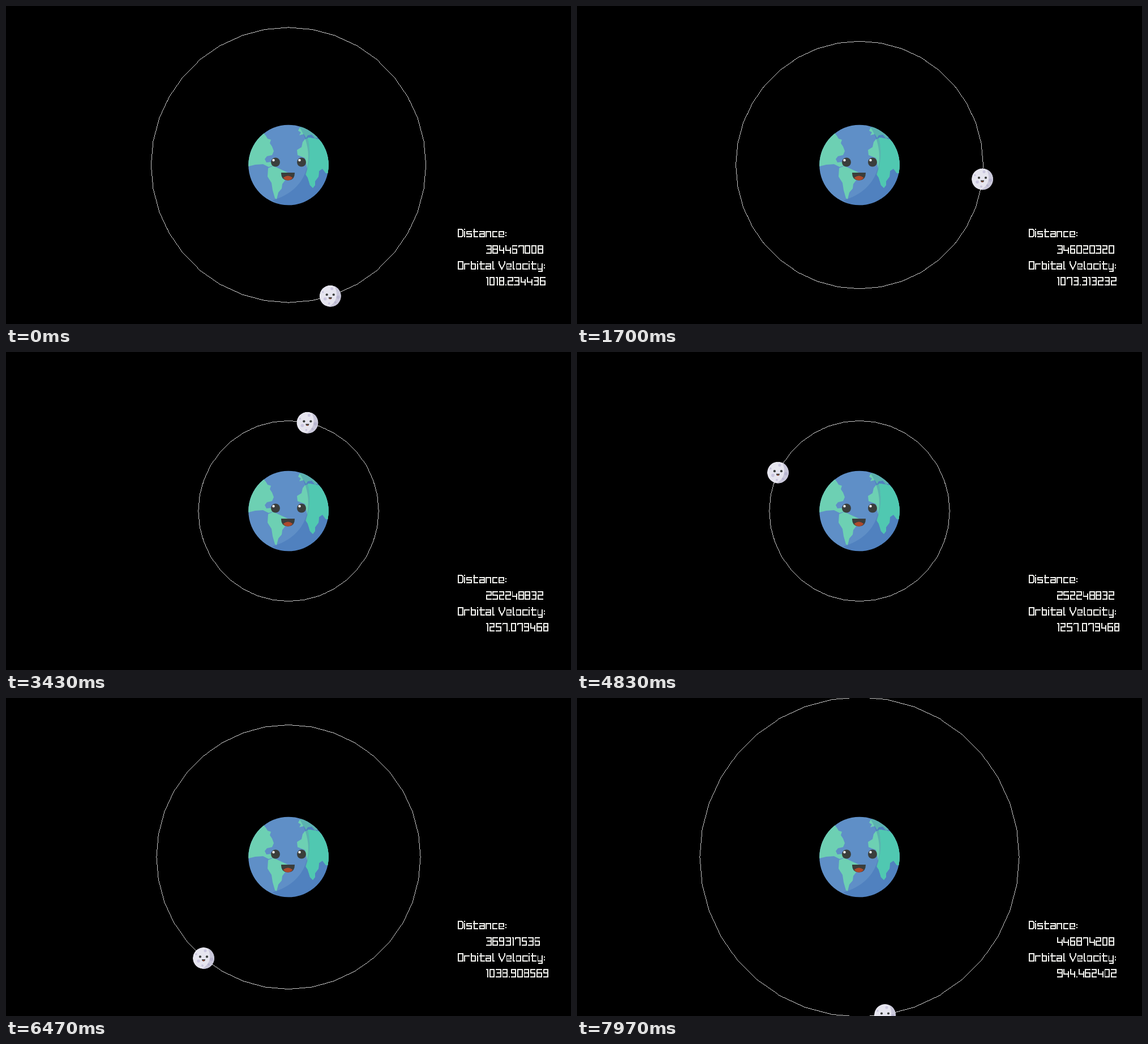
Recreate the animation shown at these times as an HTML page. Size 998 by 561 pixels, loop 8 s.

```html
<!DOCTYPE html>
<html lang="en">
<head>
<meta charset="utf-8">
<title>Moon orbit</title>
<style>
  html, body { margin: 0; width: 100%; height: 100%; overflow: hidden; background: #000; }
  svg { display: block; width: 100%; height: 100%; }
  #orbit { fill: none; stroke: #c8c8c8; shape-rendering: crispEdges; }
  .line path { fill: none; stroke: #f2f2ee; stroke-linecap: square; shape-rendering: crispEdges; }
  .line text { font: 7px "DejaVu Sans Mono", monospace; fill: transparent; }
</style>
</head>
<body>
<svg viewBox="0 0 998 561">
  <defs>
    <clipPath id="earthClip"><circle cx="499" cy="280.5" r="70.8"/></clipPath>
    <clipPath id="moonClip"><circle r="19"/></clipPath>
  </defs>

  <path id="orbit"/>

  <g clip-path="url(#earthClip)">
    <rect x="428" y="209" width="142" height="143" fill="#5f8fc7"/>
    <g fill="#6dd0b3">
      <path d="M425 220L455 224L459 229L462 234L468 236L466 242L470 248L473 256L470 263L461 265L457 270L460 276L469 275L473 281L464 284L454 279L440 280L428 283Z"/>
      <path d="M463 286L472 282L485 288L498 294L495 305L488 314L487 322L481 329L478 341L475 339L471 325L469 312L462 301Z"/>
      <path d="M528 235L537 232L552 235L575 255V295H565L559 287L553 291L552 301L546 309V316L542 321L537 316L533 303L529 297L532 287L528 268L515 263L514 254L522 249L524 240Z"/>
      <path d="M516 220L519 214L530 211L555 230L546 234L540 227L533 228L530 233L526 226L518 228L521 223Z"/>
    </g>
    <path d="M512 205C545 245 548 320 470 343L500 360H580V205Z" fill="#2458a8" opacity=".25"/>
    <path d="M533 232L552 235L575 255V295H565L559 287L553 291L552 301L546 309V316L542 321L537 316L533 303L530 298Q541 264 533 232Z" fill="#50c8b1"/>
  </g>
  <g fill="#3b3e3c">
    <circle cx="476" cy="275.5" r="8"/>
    <circle cx="522" cy="275.5" r="8"/>
    <path d="M486 294H510Q510 307.5 498 307.5T486 294Z"/>
  </g>
  <path d="M489.5 303Q498 296 506.5 303Q503 307.5 498 307.5T489.5 303Z" fill="#ad4a2c"/>
  <g fill="#fff">
    <circle cx="472.5" cy="272" r="2.2"/>
    <circle cx="518.5" cy="272" r="2.2"/>
  </g>

  <g id="moon">
    <g clip-path="url(#moonClip)">
      <circle r="19" fill="#e6e5ef"/>
      <path d="M7 -19Q19 6 -3 19H20V-19Z" fill="#c9c7da"/>
      <g fill="#cbc7e0">
        <circle cx="3" cy="-13" r="2.5"/>
        <circle cx="-9" cy="5" r="2.8"/>
        <circle cx="-13" cy="-7" r="1.8"/>
        <circle cx="-2" cy="13" r="2"/>
      </g>
      <g fill="#b9b6d0">
        <circle cx="14" cy="2" r="3"/>
        <circle cx="9" cy="11" r="2"/>
      </g>
    </g>
    <g fill="#3b3e3c">
      <circle cx="-6" cy="-2.5" r="2.1"/>
      <circle cx="6" cy="-2.5" r="2.1"/>
      <path d="M-3 2H3Q3 5.5 0 5.5T-3 2Z"/>
    </g>
    <path d="M-2 4.5Q0 2.8 2 4.5Q0 6 -2 4.5Z" fill="#ad4a2c"/>
  </g>

  <g id="readout"></g>
</svg>
<script>
const LOOP = 8000, CX = 499, CY = 280.5;
const PX_PER_METRE = 0.6313e-6;
const MOON_SPEED = 0.1526;          // px per ms along the orbit
const GM = 3.98615898e14;
const START_ANGLE = -72.35 * Math.PI / 180;
const SIDES = 36;

// Each press scales the orbit at once: [time, factor].
const presses = [
  [575, .9], [2000, .9], [2330, .9], [2806, .9],
  [4930, 1.1], [5450, 1.1], [5980, 1.1], [6330, 1.1], [6740, 1.1], [7060, 1.1]
];

// Pixel lettering: [advance, strokes] on a grid eight cells high.
const box = 'M0 0H4V7H0Z', dot = 'h.01';
const glyphs = {
  0: [6, box],
  1: [3, 'M0 0H1V7'],
  2: [6, 'M0 0H4V3H0V7H4'],
  3: [6, 'M0 0H4V7H0M1 3H4'],
  4: [6, 'M0 0V4H4M4 2V7'],
  5: [6, 'M4 0H0V3H4V7H0'],
  6: [6, 'M4 0H0V7H4V3H0'],
  7: [6, 'M0 1V0H4V7'],
  8: [6, box + 'M0 3H4'],
  9: [6, 'M4 3H0V0H4V7H0'],
  '.': [2, 'M0 7' + dot],
  ':': [2, 'M0 3' + dot + 'M0 6' + dot],
  ' ': [3, ''],
  D: [6, 'M0 0H3L4 1V6L3 7H0Z'],
  O: [6, box],
  V: [7, 'M0 0V2L2.5 7L5 2V0'],
  a: [6, 'M0 2H4V7H0V4H4'],
  b: [6, 'M0 0V7H4V2H0'],
  c: [6, 'M4 2H0V7H4'],
  e: [6, 'M4 7H0V2H4V5H0'],
  i: [2, 'M0 0' + dot + 'M0 2V7'],
  l: [3, 'M0 0V7H1'],
  n: [6, 'M0 7V2H4V7'],
  o: [6, 'M0 2H4V7H0Z'],
  r: [6, 'M0 7V2H4'],
  s: [6, 'M4 2H0V4H4V7H0'],
  t: [6, 'M1 0V7H4M0 2H4'],
  y: [6, 'M0 2V7H4M4 2V9H1']
};

const byId = id => document.getElementById(id);
function add(parent, tag, attrs) {
  const node = document.createElementNS('http://www.w3.org/2000/svg', tag);
  for (const key in attrs) node.setAttribute(key, attrs[key]);
  return parent.appendChild(node);
}

function makeLine(x, y) {
  const line = add(byId('readout'), 'g', {
    class: 'line', transform: `translate(${x} ${y}) scale(1.9)`
  });
  const strokes = add(line, 'g', { transform: 'translate(.5 .5)' });
  const label = add(line, 'text', { y: 8 });
  return text => {
    if (label.textContent === text) return;
    label.textContent = text;
    strokes.replaceChildren();
    let pen = 0;
    for (const char of text) {
      const [advance, d] = glyphs[char];
      if (d) add(strokes, 'path', { d, transform: `translate(${pen} 0)` });
      pen += advance;
    }
  };
}

makeLine(798, 393)('Distance:');
makeLine(798, 450)('Orbital Velocity:');
const showDistance = makeLine(848, 422);
const showVelocity = makeLine(848, 478);

function makeStage(start, distance, angle) {
  const radius = distance * PX_PER_METRE;
  return { start, distance, radius, angle, spin: MOON_SPEED / radius };
}
const stages = [makeStage(0, 384467008, START_ANGLE)];
for (const [time, factor] of presses) {
  const last = stages[stages.length - 1];
  stages.push(makeStage(time, Math.fround(last.distance * factor),
    last.angle + last.spin * (time - last.start)));
}

const pointAt = (radius, angle) =>
  [CX + radius * Math.cos(angle), CY - radius * Math.sin(angle)];

// One whole pixel per step along the longer axis, without smoothing.
function pixelLine([x0, y0], [x1, y1]) {
  const steps = Math.ceil(Math.max(Math.abs(x1 - x0), Math.abs(y1 - y0)));
  let d = '';
  for (let i = 0; i < steps; i++) {
    const x = Math.floor(x0 + (x1 - x0) * i / steps);
    const y = Math.floor(y0 + (y1 - y0) * i / steps);
    d += `M${x} ${y + .5}h1`;
  }
  return d;
}

function orbitPath(radius) {
  const corner = i => pointAt(radius, i * 2 * Math.PI / SIDES);
  return Array.from({ length: SIDES }, (_, i) => pixelLine(corner(i), corner(i + 1))).join('');
}

let shown;
function showStage(stage) {
  shown = stage;
  byId('orbit').setAttribute('d', orbitPath(stage.radius));
  showDistance(String(stage.distance));
  showVelocity(Math.fround(Math.sqrt(GM / stage.distance)).toFixed(6));
}

const began = performance.now();
function draw() {
  const time = (performance.now() - began) % LOOP;
  const stage = stages.filter(s => s.start <= time).pop();
  if (stage !== shown) showStage(stage);
  const [x, y] = pointAt(stage.radius, stage.angle + stage.spin * (time - stage.start));
  byId('moon').setAttribute('transform', `translate(${x} ${y})`);
  requestAnimationFrame(draw);
}
draw();
</script>
</body>
</html>
```
